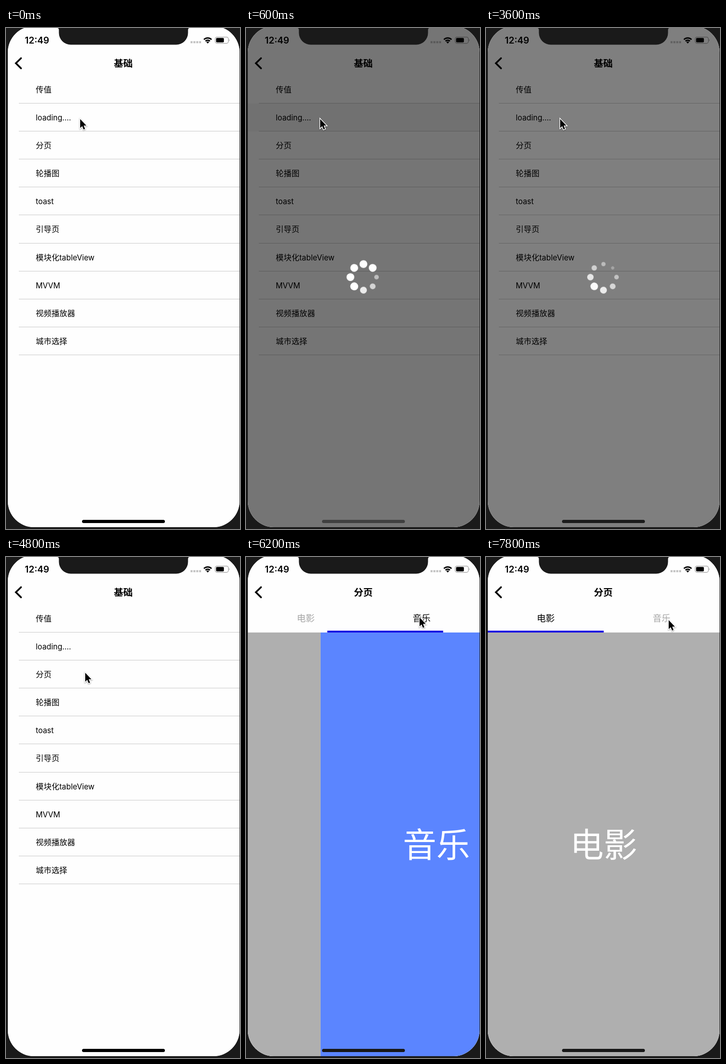
These frames come from a looping animation (511x1095 px, 8000 ms). An HTML page:

```html
<!DOCTYPE html>
<html lang="zh-CN">
<head>
<meta charset="utf-8">
<title>基础</title>
<style>
:root { --bezel: #1a1a1a; --loop: 8s linear infinite; }
html, body { margin: 0; width: 511px; height: 1095px; overflow: hidden; background: var(--bezel); }
body { position: relative; font: 17.2px "Noto Sans CJK SC", "Noto Sans CJK", sans-serif; color: #000; }
div, svg { position: absolute; }
.screen { inset: 0; background: #fefefe; clip-path: inset(-4px 1px 4px 4px round 57px); }
.page { left: 4px; top: 104px; width: 506px; height: 991px; overflow: hidden; }

/* list */
.list { background: #fefefe; animation: recede var(--loop); }
.row { position: relative; height: 61.1px; line-height: 59.1px; padding-left: 61px; box-sizing: border-box; white-space: nowrap; }
.row::after { content: ""; position: absolute; left: 24px; right: 0; bottom: 0; height: 1px; background: #c6c6c6; }
.row span { font: 16.7px Inter, sans-serif; }
.tap1 { animation: tap1 var(--loop); }
.tap2 { animation: tap2 var(--loop); }
.dim { inset: 0; background: #000; opacity: 0; animation: dim var(--loop); }
@keyframes recede {
  0%, 61.95% { transform: none; animation-timing-function: cubic-bezier(.36, .66, .04, 1); }
  68.7%, 100% { transform: translateX(-152px); }
}
@keyframes dim {
  0%, 61.95% { opacity: 0; animation-timing-function: cubic-bezier(.36, .66, .04, 1); }
  68.7%, 100% { opacity: .11; }
}
@keyframes tap1 {
  0%, 2.6% { background: #dcdcdd00; }
  2.61%, 5% { background: #dcdcdd; }
  8.25%, 100% { background: #dcdcdd00; }
}
@keyframes tap2 {
  0%, 61.25% { background: #dcdcdd00; }
  61.26%, 100% { background: #dcdcdd; }
}

/* tabbed page */
.tabs { background: #fefefe; animation: enter var(--loop); }
.tab { top: 0; width: 253px; line-height: 58px; text-align: center; font-size: 19.6px; }
.film { left: 0; animation: film var(--loop); }
.music { left: 253px; animation: music var(--loop); }
.bar { left: 0; top: 57px; width: 253px; height: 4px; background: #1500e2; animation: bar var(--loop); }
.pager { left: 0; top: 61px; width: 1012px; height: 930px; animation: pager var(--loop); }
.pane { width: 506px; height: 930px; line-height: 919px; text-align: center; font-size: 73.4px; color: #fff; }
.pane:first-child { background: #afafaf; }
.pane:last-child { left: 506px; background: #5b85ff; }
@keyframes enter {
  0%, 61.95% { transform: translateX(507px); animation-timing-function: cubic-bezier(.36, .66, .04, 1); }
  68.7%, 100% { transform: none; }
}
@keyframes film {
  0%, 75.1% { color: #000; }
  75.11%, 88.2% { color: #a6a6a6; }
  88.21%, 100% { color: #000; }
}
@keyframes music {
  0%, 75.1% { color: #a6a6a6; }
  75.11%, 88.2% { color: #000; }
  88.21%, 100% { color: #a6a6a6; }
}
@keyframes bar {
  0%, 75.22% { transform: none; animation-timing-function: ease-in-out; }
  78.97%, 88.25% { transform: translateX(253px); animation-timing-function: ease-in-out; }
  92%, 100% { transform: none; }
}
@keyframes pager {
  0%, 75.22% { transform: none; animation-timing-function: ease-in-out; }
  78.97%, 88.25% { transform: translateX(-506px); animation-timing-function: ease-in-out; }
  92%, 100% { transform: none; }
}

/* navigation and status */
.nav { left: 0; top: 0; width: 511px; height: 104px; background: #fefefe; }
.title { left: 4px; width: 504px; top: 46px; line-height: 60px; text-align: center; font-size: 20.6px; font-weight: 600; }
.old { animation: old var(--loop); }
.new { animation: new var(--loop); }
.clock { left: 41px; top: 17px; font: 600 20px/20px Inter, sans-serif; }
@keyframes old {
  0%, 61.95% { transform: none; opacity: 1; animation-timing-function: cubic-bezier(.36, .66, .04, 1); }
  68.7%, 100% { transform: translateX(-228px); opacity: 0; }
}
@keyframes new {
  0%, 61.95% { transform: translateX(270px); opacity: 0; animation-timing-function: cubic-bezier(.36, .66, .04, 1); }
  68.7%, 100% { transform: none; opacity: 1; }
}

/* loading overlay */
.overlay { inset: 0; opacity: 0; animation: overlay var(--loop); }
.shade { inset: 0; background: #000; animation: shade var(--loop); }
.dot { left: 248px; top: 535.5px; width: 17px; height: 17px; transform: rotate(calc(45deg * var(--i))) translateX(28.5px); }
.dot::before, .dot::after { content: ""; position: absolute; inset: 0; border-radius: 50%; background: #fff; }
.dot::before { animation: pulse 1s linear calc(120ms * var(--i) - 1740ms) infinite; }
/* each dot stays whole until its turn comes */
.dot::after { animation: whole 8s linear calc(120ms * var(--i) - 1000ms) infinite; }
@keyframes overlay {
  0%, 3.25% { opacity: 0; }
  5.75%, 45.6% { opacity: 1; }
  48.1%, 100% { opacity: 0; }
}
@keyframes shade {
  0%, 31.25% { opacity: .54; }
  43.75%, 100% { opacity: .5; }
}
@keyframes pulse {
  0%, 100% { transform: none; opacity: 1; }
  50% { transform: scale(.4); opacity: .3; }
}
@keyframes whole {
  0%, 15.75% { opacity: 1; }
  15.751%, 100% { opacity: 0; }
}

.home { left: 166px; top: 1075px; width: 181px; height: 7px; border-radius: 4px; animation: home var(--loop); }
@keyframes home {
  0%, 3.25% { background: #000; }
  5.75%, 31.25% { background: #404040; }
  43.75%, 45.6% { background: #1c1c1c; }
  48.1%, 61.95% { background: #000; }
  68%, 100% { background: #171717; }
}

.cursor { left: 0; top: 0; overflow: visible; filter: drop-shadow(0 1.5px 1.2px #0006); animation: cursor var(--loop); }
@keyframes cursor {
  0%, 48.75% { transform: translate(162px, 199px); animation-timing-function: ease-in-out; }
  52.5%, 71.25% { transform: translate(173px, 253px); animation-timing-function: ease-in-out; }
  74.5%, 79.4% { transform: translate(379px, 132px); animation-timing-function: ease-in-out; }
  84.4%, 88.75% { transform: translate(150px, 134px); animation-timing-function: ease-in-out; }
  96.25%, 100% { transform: translate(399px, 138px); }
}
</style>
</head>
<body>
<div class="screen">
  <div class="page list">
    <div class="row">传值</div>
    <div class="row tap1"><span>loading....</span></div>
    <div class="row tap2">分页</div>
    <div class="row">轮播图</div>
    <div class="row"><span>toast</span></div>
    <div class="row">引导页</div>
    <div class="row">模块化<span>tableView</span></div>
    <div class="row"><span>MVVM</span></div>
    <div class="row">视频播放器</div>
    <div class="row">城市选择</div>
    <div class="dim"></div>
  </div>

  <div class="page tabs">
    <div class="pager">
      <div class="pane">电影</div>
      <div class="pane">音乐</div>
    </div>
    <div class="tab film">电影</div>
    <div class="tab music">音乐</div>
    <div class="bar"></div>
  </div>

  <div class="nav">
    <div class="title old">基础</div>
    <div class="title new">分页</div>
    <div class="clock">12:49</div>
    <svg width="511" height="104" fill="none">
      <path d="M32.8 66 21.6 77 32.8 88.2" stroke="#000" stroke-width="3.8" stroke-linecap="round"/>
      <path d="M403 31H426" stroke="#c2c2c2" stroke-width="4.4" stroke-dasharray="4.4 1.8"/>
      <g stroke="#000" stroke-width="2.9">
        <path d="M432.2 25.3A11.6 11.6 0 0 1 448.8 25.3"/>
        <path d="M435.6 28.7A7 7 0 0 1 445.4 28.7"/>
      </g>
      <path d="M440.5 34 437.4 30.7A4.4 4.4 0 0 1 443.6 30.7Z" fill="#000"/>
      <rect x="456.8" y="19.8" width="28.8" height="13.8" rx="4" stroke="#999" stroke-width="1.2"/>
      <rect x="458.8" y="21.8" width="17" height="9.8" rx="2" fill="#000"/>
      <path d="M487 24.3Q489.4 26.7 487 29.1Z" fill="#999"/>
    </svg>
  </div>

  <div class="overlay">
    <div class="shade"></div>
    <div class="dot" style="--i:0"></div>
    <div class="dot" style="--i:1"></div>
    <div class="dot" style="--i:2"></div>
    <div class="dot" style="--i:3"></div>
    <div class="dot" style="--i:4"></div>
    <div class="dot" style="--i:5"></div>
    <div class="dot" style="--i:6"></div>
    <div class="dot" style="--i:7"></div>
  </div>
  <div class="home"></div>
</div>

<svg width="511" height="40" style="left:0;top:0">
  <path fill="#1a1a1a" d="M112 0Q115.5 0 115.5 5V10.6A26 26 0 0 0 141.5 36.6H371.5A26 26 0 0 0 397.5 10.6V5Q397.5 0 401 0Z"/>
</svg>
<svg class="cursor" width="20" height="30">
  <path d="M0 0V19.6L4.4 15.6 7.4 22.7 10.6 21.4 7.6 14.2H13.5Z" stroke="#fff" stroke-width="3" paint-order="stroke"/>
</svg>
</body>
</html>
```
